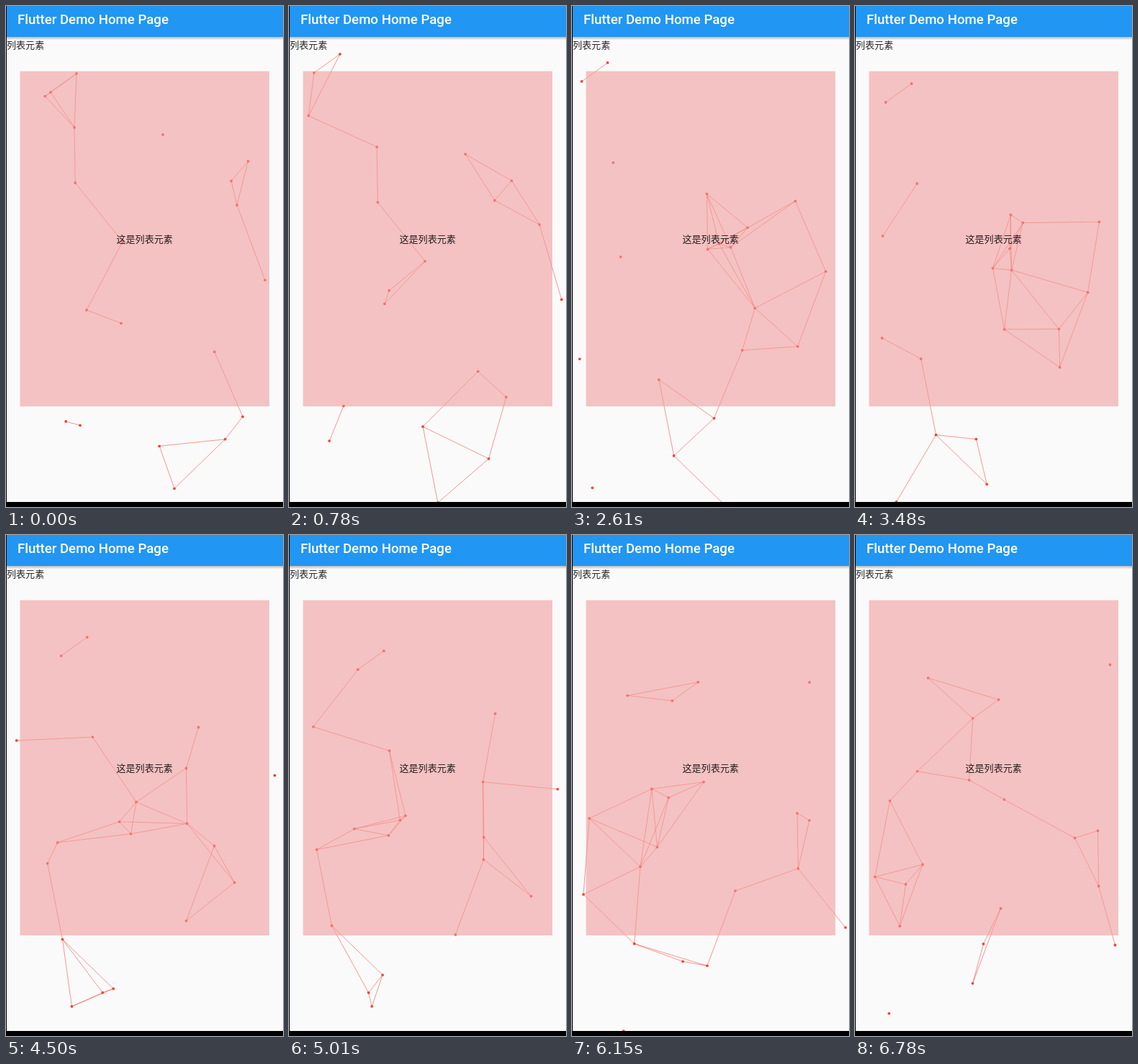
Recreate the animation shown at these times as an HTML page with a canvas. Size 385 px wide and 697 px high, loop 6.81 s.

```html
<!DOCTYPE html>
<html lang="zh-CN">
<head>
<meta charset="utf-8">
<style>
  html, body { margin: 0; width: 100%; height: 100%; overflow: hidden; background: #fafafa; }
  canvas, svg { position: absolute; left: 0; top: 0; }
  text { font: 13.07px "Noto Sans CJK SC", "Noto Sans CJK", sans-serif; fill: #000; fill-opacity: .85; }
  .title { font: 500 18.67px Roboto, sans-serif; fill: #fff; fill-opacity: 1; }
</style>
</head>
<body>
<canvas width="385" height="697"></canvas>
<svg width="385" height="697">
  <linearGradient id="shade" x2="0" y2="1">
    <stop stop-opacity=".26"/>
    <stop offset="1" stop-opacity="0"/>
  </linearGradient>
  <rect x="19.5" y="90.7" width="346.5" height="466.3" fill="#f29a9a" fill-opacity=".575"/>
  <text x="153.5" y="329">这是列表元素</text>
  <text x="1" y="59">列表元素</text>
  <rect y="43" width="385" height="4.5" fill="url(#shade)"/>
  <rect width="385" height="43" fill="#2196f3"/>
  <text class="title" x="15.9" y="25">Flutter Demo Home Page</text>
  <path d="M0 0H1V690H385V697H0Z"/>
</svg>
<script>
const LOOP = 6810, STEP = 30, REACH = 112;
const LEFT = 9.6, RIGHT = 383, TOP = 53.3, BOTTOM = 694.7;

// Start points in mirrored space: all move right and down together;
// a point before the left or top wall shows up reflected.
const dots = [
  [-78.8, 12.6], [-42.8, -13.4], [-35.1, 125.6], [95, 169], [218, 179],
  [-317.3, 216], [-293.8, 243.4], [321, 277], [96.2, 246], [162, 328],
  [360, 381.3], [112, -316.4], [-140.8, -334.8], [-270.6, 481.2], [-309.8, -464.7],
  [-285.5, 602.7], [-194, -505.7], [-214.8, 671.3], [-64, 578], [-83.8, -476.8]
];

// Key times and the distance covered by then along each axis
const keys = [[0, 0], [1530, 53.2], [2070, 74.3], [4500, 155.5], [5550, 194.8], [6780, 242.5]];

const ctx = document.querySelector("canvas").getContext("2d");
ctx.fillStyle = ctx.strokeStyle = "#f44336";
ctx.lineWidth = 0.55;

function travelled(t) {
  const i = Math.max(1, keys.findIndex(k => k[0] >= t));
  const [t0, s0] = keys[i - 1], [t1, s1] = keys[i];
  return s0 + (s1 - s0) * (t - t0) / (t1 - t0);
}

// Fold a straight path between two walls
function bounce(v, lo, hi) {
  const span = hi - lo, period = 2 * span;
  const u = ((v - lo) % period + period) % period;
  return hi - Math.abs(u - span);
}

function draw(time) {
  const s = travelled(Math.floor(time % LOOP / STEP) * STEP);
  const pts = dots.map(([x, y]) => [bounce(x + s, LEFT, RIGHT), bounce(y + s, TOP, BOTTOM)]);

  ctx.clearRect(0, 0, 385, 697);
  ctx.beginPath();
  pts.forEach(([x, y], i) => {
    for (const [u, v] of pts.slice(i + 1)) {
      if (Math.hypot(u - x, v - y) < REACH) {
        ctx.moveTo(x, y);
        ctx.lineTo(u, v);
      }
    }
  });
  ctx.stroke();

  for (const [x, y] of pts) {
    ctx.beginPath();
    ctx.arc(x, y, 1.9, 0, 2 * Math.PI);
    ctx.fill();
  }
}

const start = performance.now();
function tick() {
  draw(performance.now() - start);
  requestAnimationFrame(tick);
}
tick();
</script>
</body>
</html>
```
